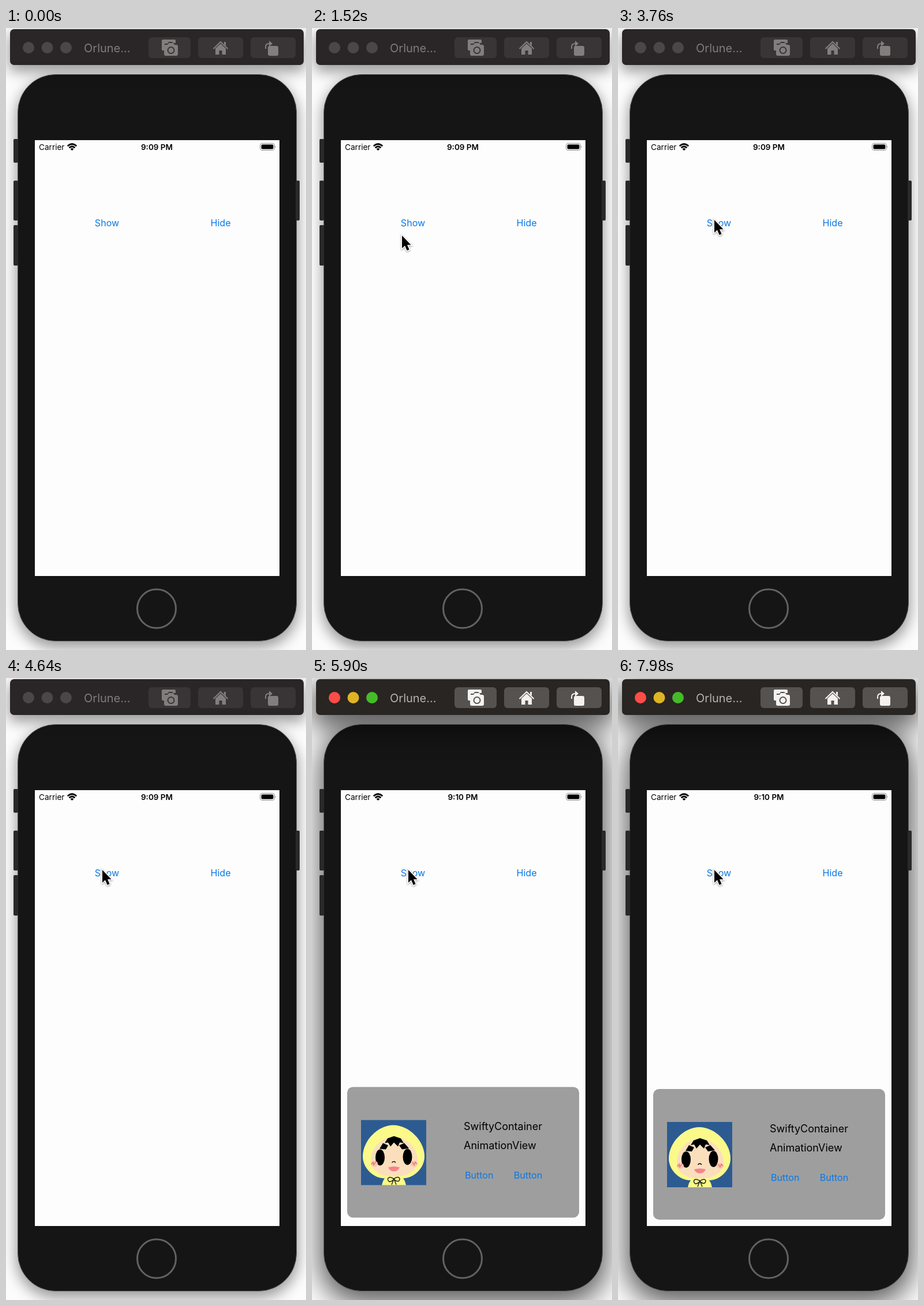
An HTML page for the animation above (8 s loop, 520x1076 px).

```html
<!DOCTYPE html>
<html lang="en">
<head>
<meta charset="utf-8">
<title>Sliding card</title>
<style>
  html, body { margin: 0; width: 100%; height: 100%; overflow: hidden; background: #fcfcfc; }
  #stage { position: relative; width: 520px; height: 1076px; overflow: hidden; font-family: Inter, Roboto, sans-serif;
    --light: #4b4647; --title: #817b7c; --key: #393435; --icon: #827e7e; --bar: #2a2526;
    --shade: 0 9px 25px 2px rgba(0,0,0,.4); }
  #stage.active { --title: #b5b1ae; --key: #555250; --icon: #f4f2f0; --bar: #292522;
    --shade: 0 14px 46px 8px rgba(0,0,0,.62); }
  .box { position: absolute; box-shadow: var(--shade); }
  #bar { left: 7px; top: 2px; width: 509px; height: 62px; border-radius: 7px; background: var(--bar); }
  #phone { left: 20px; top: 80px; width: 484px; height: 981px; box-sizing: border-box;
    border: 1.5px solid #58585c; border-radius: 66px; background: #151515; }
  svg { position: absolute; left: 0; top: 0; }
  .light { fill: var(--light); }
  .active .red { fill: #fc4d48; }
  .active .amber { fill: #dfb423; }
  .active .green { fill: #45bb29; }
  .key { fill: var(--key); }
  .icon { fill: var(--icon); }
  .line { fill: none; stroke: var(--icon); stroke-width: 2; }
  .link { fill: #0a78e6; font-size: 16.1px; }
  .mid { text-anchor: middle; }
</style>
</head>
<body>
<div id="stage">
  <div id="phone" class="box"></div>
  <div id="bar" class="box"></div>
  <svg width="520" height="1076" viewBox="0 0 520 1076">
    <defs>
      <clipPath id="screen"><rect x="50" y="194" width="424" height="754"/></clipPath>
      <clipPath id="frame"><rect width="113" height="113"/></clipPath>
    </defs>

    <!-- window bar -->
    <circle class="light red" cx="39" cy="34" r="10"/>
    <circle class="light amber" cx="71.5" cy="34" r="10"/>
    <circle class="light green" cx="104" cy="34" r="10"/>
    <text x="135" y="42" font-size="20" fill="var(--title)">Orlune…</text>
    <rect class="key" x="247" y="16" width="73" height="36" rx="6"/>
    <rect class="key" x="333" y="16" width="78" height="36" rx="6"/>
    <rect class="key" x="424" y="16" width="78" height="36" rx="6"/>
    <path class="icon" d="M272 20H292Q294 20 294 22V26H290L288 24H282L280 27H275V39H272Q270 39 270 37V22Q270 20 272 20Z"/>
    <path class="icon" d="M276 29H280L282 26H290L292 29H295Q298 29 298 32V45Q298 48 295 48H277Q274 48 274 45V31Q274 29 276 29Z"/>
    <circle cx="286" cy="38.5" r="5.5" fill="none" stroke="var(--key)" stroke-width="2"/>
    <path class="line" d="M359.5 36L372 24L384.5 36" stroke-width="2.5"/>
    <path class="icon" d="M372 27L381 35.5V46H374.5V39H369.5V46H363V35.5ZM378 24H381V31L378 28Z"/>
    <rect class="icon" x="454" y="31" width="18" height="17" rx="3"/>
    <path class="line" d="M450 36V33Q450 27 456 27H457"/>
    <path class="icon" d="M456 22L462 27L456 32Z"/>

    <!-- side buttons and home ring -->
    <g fill="#29292b">
      <rect x="13" y="192" width="8" height="41" rx="2"/>
      <rect x="13" y="264" width="8" height="69" rx="2"/>
      <rect x="13" y="341" width="8" height="70" rx="2"/>
      <rect x="502" y="264" width="7" height="69" rx="2"/>
    </g>
    <circle cx="261" cy="1004.5" r="33.5" fill="none" stroke="#626262" stroke-width="3"/>

    <g clip-path="url(#screen)">
      <rect x="50" y="194" width="424" height="754" fill="#fdfdfd"/>
      <text x="57" y="211" font-size="13.6">Carrier</text>
      <g fill="none" stroke="#000" stroke-width="2.8">
        <path d="M106.8 204.2Q114.5 197.2 122.2 204.2"/>
        <path d="M109.6 207.3Q114.5 202.6 119.4 207.3"/>
      </g>
      <path d="M111.6 209.2Q114.5 206.6 117.4 209.2L114.5 212Z"/>
      <text id="clock" class="mid" x="261.5" y="211" font-size="13.5" font-weight="600">9:09 PM</text>
      <rect x="440.5" y="199.5" width="25" height="12" rx="3.5" fill="none" stroke="#929292"/>
      <rect x="442.5" y="201.5" width="21" height="8" rx="2"/>
      <path d="M466.5 203.5Q468.5 205.5 466.5 207.5Z" fill="#929292"/>
      <text id="show" class="link mid" x="175" y="343">Show</text>
      <text class="link mid" x="372" y="343">Hide</text>

      <g id="card">
        <rect x="61" width="402" height="226" rx="10" fill="#9e9e9e"/>
        <g transform="translate(85 57)" clip-path="url(#frame)">
          <rect width="113" height="113" fill="#2c5b91"/>
          <path d="M36 113Q38 103 43 99H71Q76 103 78 113Z" fill="#fbf98a"/>
          <path d="M56 9C83 9 110 36 110 63C110 83 92 101 72 101H41C21 101 3 83 3 63C3 36 29 9 56 9Z" fill="#fbf98a"/>
          <path d="M57 29C77 29 98 47 98 70C98 88 80 98 57 98C34 98 17 88 17 70C17 47 37 29 57 29Z" fill="#fbdfbd"/>
          <path d="M57 28L69 32L74 40L67 39L64 46L57 39L51 46L47 39L41 40L46 32Z"/>
          <path d="M38 40L47 44L43 51L32 50ZM75 40L66 44L71 51L83 49Z"/>
          <ellipse cx="33" cy="65" rx="8" ry="14"/>
          <ellipse cx="80.5" cy="64" rx="8" ry="14"/>
          <g fill="#fac4b0">
            <ellipse cx="23" cy="76" rx="6" ry="5"/>
            <ellipse cx="92" cy="76" rx="6" ry="5"/>
          </g>
          <path d="M18 77L21 73L22 78L26 72M89 73L92 78L94 73L97 76" fill="none" stroke="#ea6966" stroke-width="1.2"/>
          <path d="M53.5 74Q57 70 60 74" fill="none" stroke="#000" stroke-width="1.4"/>
          <path d="M47 82Q57 79 67 82Q64 89 57 89Q50 89 47 82Z" fill="#f4858a"/>
          <path d="M57 102C48 96 43 102 49 107Q54 107 57 102C65 96 70 101 65 106Q60 107 57 102L53 112M57 102L61 112" fill="none" stroke="#26261c" stroke-width="1.5"/>
        </g>
        <text x="263" y="75" font-size="18">SwiftyContainer</text>
        <text x="263" y="108" font-size="18">AnimationView</text>
        <text class="link mid" x="289.7" y="159">Button</text>
        <text class="link mid" x="374.5" y="159">Button</text>
      </g>
    </g>

    <g id="cursor" style="filter: drop-shadow(0 1.5px 1.5px rgba(0,0,0,.4))">
      <path d="M0 0V22L5 17.5L8.7 26L12.6 24.3L9 16.2H15.6Z" stroke="#fff" stroke-width="3" paint-order="stroke"/>
    </g>
  </svg>
</div>
<script>
  const LOOP = 8000, WAKE = 4700, PRESS = 5000, RELEASE = 5105;
  const CARD_HIDDEN = 948, CARD_SHOWN = 711;
  const [stage, clock, show, card, cursor] =
    ['stage', 'clock', 'show', 'card', 'cursor'].map(id => document.getElementById(id));

  // time, x, y of the pointer tip
  const path = [
    [900, 60, 520], [1400, 156, 359], [1800, 156, 359],
    [2250, 147, 301], [2900, 147, 301], [3500, 167, 332]
  ];

  const clamp = v => Math.min(1, Math.max(0, v));
  const smooth = v => v * v * (3 - 2 * v);

  function pointer(t) {
    let i = 1;
    while (i < path.length - 1 && t > path[i][0]) i++;
    const [t0, x0, y0] = path[i - 1], [t1, x1, y1] = path[i];
    const k = smooth(clamp((t - t0) / (t1 - t0)));
    return [x0 + (x1 - x0) * k, y0 + (y1 - y0) * k];
  }

  // Step response of a damped spring, time in seconds
  function spring(t, ratio = 0.8, speed = 6.6) {
    if (t <= 0) return 0;
    const root = Math.sqrt(1 - ratio * ratio), a = speed * root * t;
    return 1 - Math.exp(-ratio * speed * t) * (Math.cos(a) + ratio / root * Math.sin(a));
  }

  function draw(t) {
    const [x, y] = pointer(t);
    cursor.setAttribute('transform', `translate(${x} ${y})`);
    cursor.setAttribute('visibility', t < path[0][0] ? 'hidden' : 'visible');

    stage.classList.toggle('active', t >= WAKE);
    clock.textContent = t < WAKE ? '9:09 PM' : '9:10 PM';
    show.setAttribute('opacity', t < PRESS ? 1 : 0.2 + 0.8 * smooth(clamp((t - RELEASE) / 600)));

    const top = CARD_HIDDEN + (CARD_SHOWN - CARD_HIDDEN) * spring((t - RELEASE) / 1000);
    card.setAttribute('transform', `translate(0 ${top})`);
  }

  const start = performance.now();
  function tick() {
    draw((performance.now() - start) % LOOP);
    requestAnimationFrame(tick);
  }
  tick();
</script>
</body>
</html>
```
